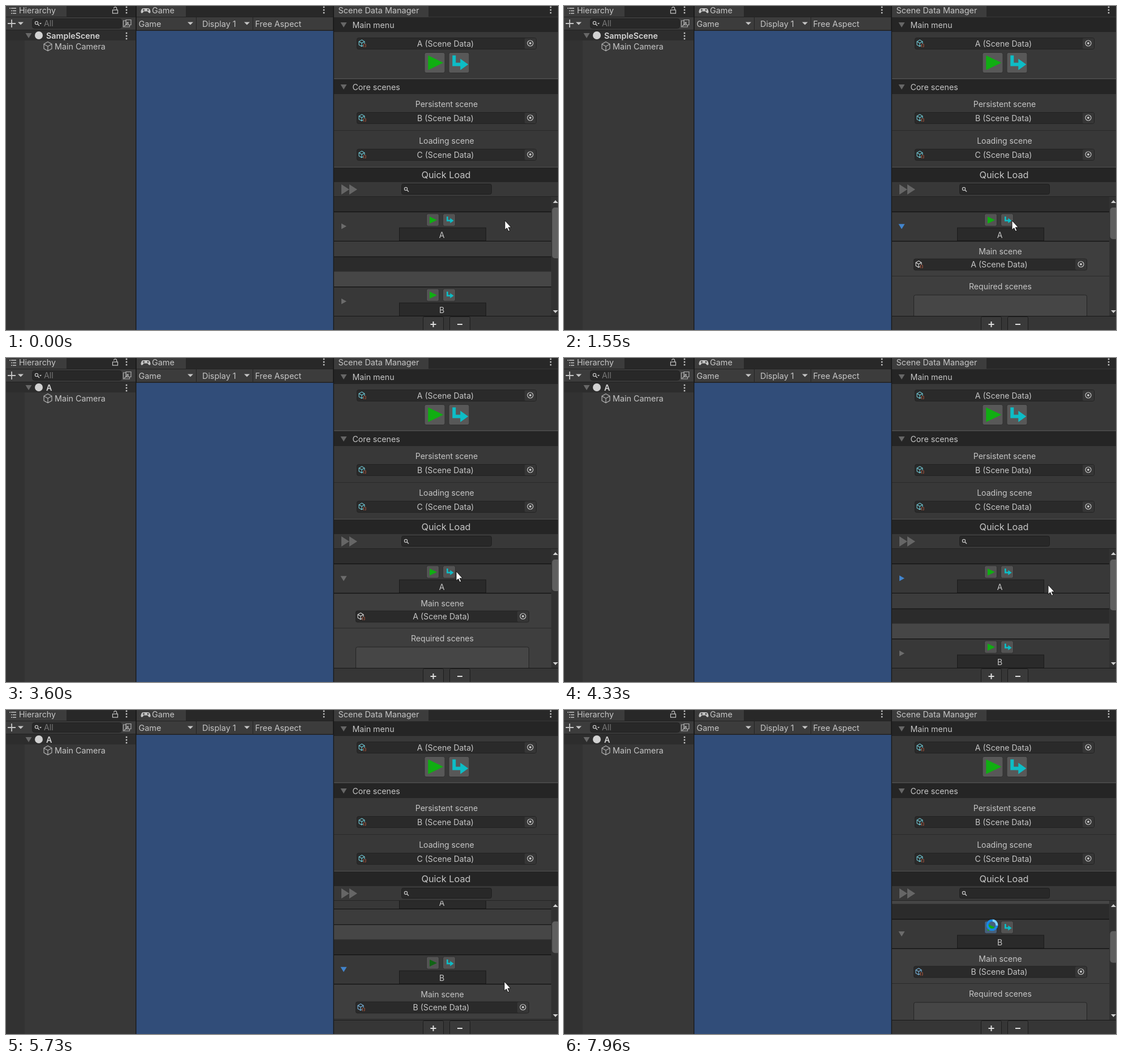
Animation of 976x574 px, one loop 8000 ms. Source, as an HTML page:

```html
<!DOCTYPE html>
<html lang="en">
<head>
<meta charset="utf-8">
<title>Scene manager</title>
<style>
  html, body { margin: 0; width: 100%; height: 100%; overflow: hidden; background: #383838; }
  svg { display: block; width: 976px; height: 574px; }
  text { font-family: Inter, "Liberation Sans", sans-serif; white-space: pre; }
</style>
</head>
<body>
<svg id="stage" viewBox="0 0 976 574"></svg>
<script>
const LOOP = 8000;
const GREY = '#6c6c6c', BLUE = '#4284cc', INK = '#c6c6c6', DARK = '#282828', LINE = '#1b1b1b';

// Drawing helpers; text is placed by the middle of its capitals.
const rect = (x, y, w, h, fill, extra = '') =>
  `<rect x="${x}" y="${y}" width="${w}" height="${h}" fill="${fill}" ${extra}/>`;
const box = (x, y, w, h, fill, border = LINE, r = 3) =>
  rect(x + .5, y + .5, w - 1, h - 1, fill, `rx="${r}" stroke="${border}"`);
const path = (d, fill, extra = '') => `<path d="${d}" fill="${fill}" ${extra}/>`;
const line = (d, color = INK, width = 1.3) => path(d, 'none', `stroke="${color}" stroke-width="${width}"`);
const dot = (x, y, r, fill, extra = '') => `<circle cx="${x}" cy="${y}" r="${r}" fill="${fill}" ${extra}/>`;
const text = (x, y, str, { size = 14.2, fill = INK, anchor = 'start', weight = 400 } = {}) =>
  `<text x="${x}" y="${y + size * .36}" font-size="${size}" fill="${fill}" text-anchor="${anchor}" font-weight="${weight}">${str}</text>`;
const centered = (x, y, str, size = 14.1) => text(x, y, str, { size, anchor: 'middle' });
const at = (x, y, body, scale = 1) => `<g transform="translate(${x} ${y}) scale(${scale})">${body}</g>`;

const triDown = (x, y, fill = GREY) => path(`M${x - 5.5} ${y - 4}h11l-5.5 9z`, fill);
const triRight = (x, y, fill = GREY) => path(`M${x - 4} ${y - 5}v10l9 -5z`, fill);
const caret = (x, y) => path(`M${x - 5} ${y - 2.5}h10l-5 5z`, INK);
const kebab = (x, y) => [-5, 0, 5].map(d => rect(x - 1.2, y + d - 1.2, 2.5, 2.5, INK)).join('');
const magnifier = (x, y) =>
  dot(x - 1, y - 1, 2.6, 'none', `stroke="${INK}" stroke-width="1.2"`) + line(`M${x + 1} ${y + 1}l3 3`, INK, 1.5);
const cube = (x, y, r, color, width) => {
  const w = r * .87, h = r / 2;
  return at(x, y, line(`M0 ${-r}L${w} ${-h}V${h}L0 ${r}L${-w} ${h}V${-h}ZM${-w} ${-h}L0 0L${w} ${-h}M0 0V${r}`, color, width));
};
const assetIcon = (x, y, color) => cube(x - 1, y - .7, 5.7, color, 1.1) +
  rect(x + 1.5, y + .5, 6, 6.5, '#2a2a2a') +
  line(`M${x + 3.4} ${y + 1}h-1v5h1M${x + 5} ${y + 1}h1v5h-1`, '#b0563c', 1);

const field = (x, y, w, label, cx, color = '#6fc6d2') =>
  box(x, y, w, 21, '#2a2a2a', '#222') +
  rect(x + w - 21, y + 1, 20, 19, '#363636', 'rx="2"') +
  dot(x + w - 11, y + 10, 5, 'none', `stroke="${INK}" stroke-width="1.2"`) +
  dot(x + w - 11, y + 10, 2, INK) +
  assetIcon(x + 10, y + 10.5, color) + centered(cx, y + 10.5, label);

const playShape = (fill = '#10ae12') => path('M0 0V26L27 13Z', fill);
const loadShape = path('M0 0H6V13H14V6L28 16L14 26V19H0Z', '#0dbdc6');

const panelHeader = (y, label) =>
  rect(580, y, 396, 26, '#252525') + triDown(597, y + 13, '#666') + text(612.5, y + 13.5, label);

function chrome() {
  const hierarchy =
    rect(0, 0, 229, 574, '#383838') + rect(0, 0, 229, 19, DARK) + rect(0, 0, 107, 20, '#3c3c3c') +
    rect(0, 20, 229, 23, '#3c3c3c') + rect(0, 19, 229, 1, '#232323') +
    rect(0, 43, 33, 531, '#323232') + rect(0, 43, 229, 18, '#2d2d2d') + rect(0, 42, 229, 1, '#222') +
    line('M6 4h2M9 4h9M9 8.5h2M12 8.5h6M9 13h2M12 13h6', INK, 1.5) + text(23, 8, 'Hierarchy') +
    rect(188.5, 7, 9, 6, 'none', `stroke="${INK}" stroke-width="1.2"`) +
    line('M190.5 4.5a2.6 2.6 0 0 1 5.2 0V7', INK, 1.2) + kebab(213, 7) +
    line('M3 31h14M10 24v14', INK, 1.8) + caret(26, 31) +
    box(46, 22, 159, 18, DARK, '#202020', 4) + magnifier(55, 31) + path('M59 30h4l-2 2.5z', INK) +
    text(67, 31, 'All', { fill: '#777' }) +
    line('M213 26h-5.5v11h11v-4M212 24.5h9v9h-9zM209 36l7 -7M212 29h4v4', '#b0b0b0', 1.2) +
    triDown(40, 52, '#686868') + dot(58, 52, 7, '#d2d2d2') + kebab(213, 53) +
    cube(74, 71.5, 8, '#aaa', 1.3) + text(86, 71.5, 'Main Camera', { size: 14.35 });

  const pad = path('M243 4h8c3 0 4 3 4.500 6c.3 3 -2.500 3.500 -4 1l-1 -1.500h-7l-1 1.500c-1.500 2.500 -4.300 2 -4 -1c.5 -3 1.500 -6 4.500 -6z', INK) +
    line('M241.500 7h4M243.500 5v4', '#3c3c3c', 1) + dot(251, 7, 1.4, '#3c3c3c');
  const game =
    rect(229, 0, 2, 574, LINE) + rect(231, 0, 347, 19, DARK) + rect(231, 0, 87, 20, '#3c3c3c') +
    rect(231, 19, 347, 1, '#232323') + rect(231, 20, 347, 23, '#3c3c3c') + pad +
    text(258, 8, 'Game', { size: 14.4 }) + kebab(562, 7) +
    text(234.5, 31.5, 'Game', { size: 14.4 }) + caret(326, 31) + rect(336, 20, 1, 22, '#242424') +
    text(347, 31.5, 'Display 1', { size: 14.4 }) + caret(426, 31) + rect(436, 20, 1, 22, '#242424') +
    text(440.5, 31.5, 'Free Aspect', { size: 14.4 }) +
    rect(231, 42.5, 347, 1.5, '#202020') + rect(578, 0, 2, 574, LINE) +
    rect(230.5, 44, 348, 530, '#314d79');

  const bigButton = x => box(x, 82, 37, 37, '#585858', '#303030');
  const manager =
    rect(580, 0, 396, 574, '#383838') + rect(580, 0, 396, 19, DARK) + rect(580, 0, 167, 20, '#3c3c3c') +
    text(587.5, 8, 'Scene Data Manager', { size: 14.45 }) + kebab(963, 7) +
    panelHeader(20, 'Main menu') + field(620, 56, 318, 'A (Scene Data)', 777) +
    bigButton(739.5) + at(746.3, 87.5, playShape()) + bigButton(782.5) + at(789.3, 87.5, loadShape) +
    rect(580, 128, 396, 1, '#525252') + panelHeader(130, 'Core scenes') +
    centered(779, 174, 'Persistent scene') + field(620, 188, 318, 'B (Scene Data)', 777) +
    rect(580, 220, 396, 1, '#2a2a2a') +
    centered(779, 239, 'Loading scene') + field(620, 253, 318, 'C (Scene Data)', 777) +
    rect(580, 285, 396, 1, '#525252') + rect(580, 286, 396, 26, '#252525') +
    centered(778, 299, 'Quick Load', 16.3) +
    path('M593 316v18l14 -9zM607 316v18l14 -9z', '#666') +
    box(699, 315, 160, 19, DARK, '#1e1e1e') + magnifier(708, 325) +
    rect(580, 337, 396, 1, '#242424');

  const footer = rect(580, 549, 396, 25, '#363636') + rect(580, 549, 396, 1, '#181818') +
    [737, 784].map(x => box(x, 550, 37, 30, '#3a3a3a', '#1c1c1c', 2)).join('') +
    line('M750.500 564h10M755.500 559v10M798 564h9', '#e0e0e0', 2);
  return hierarchy + game + manager + footer;
}

function entry(y, name, { open, focus, playDown, loadDown, playFill }) {
  const button = (x, down) => box(x, y + 3.5, 23, 23, down ? '#46607c' : '#535353', '#303030');
  const body = rect(580, y + 53, 384, 250, '#3e3e3e') +
    centered(771.5, y + 71, 'Main scene') +
    field(618, y + 83.5, 307, `${name} (Scene Data)`, 769.5, name === 'A' ? '#d8d8d8' : '#78b4dc') +
    rect(580, y + 114, 384, 1, '#2a2a2a') + centered(771.5, y + 133, 'Required scenes') +
    box(618, y + 147.5, 307, 120, '#464646', '#242424');
  return rect(580, y, 384, 53, '#383838') +
    rect(580, y, 384, 1.3, '#121212') +
    (open ? triDown : triRight)(597, y + 26.3, focus ? BLUE : GREY) +
    button(743, playDown) + at(749, y + 9, playShape(playFill), .48) +
    button(772, loadDown) + at(779, y + 9, loadShape, .45) +
    box(695, y + 28.5, 154, 24, '#2a2a2a', '#1a1a1a', 0) + centered(770.5, y + 41.5, name) +
    (open ? body : '') + rect(580, y + 52, 384, 1.3, '#121212');
}

const within = (t, from, to) => t >= from && t < to;

function list(t) {
  const openA = within(t, 320, 4000), openB = t >= 5150;
  const scroll = t < 5690 ? 0 : t < 6040 ? 64 : 127;
  const swapped = t >= 4600;
  const stripes = swapped ? ['#464646', '#2b2b2b'] : ['#2b2b2b', '#464646'];
  const a = entry(364, 'A', {
    open: openA,
    focus: within(t, 270, 2450) || within(t, 3960, 5110),
    loadDown: within(t, 2450, 2860)
  });
  const b = entry(497, 'B', {
    open: openB,
    focus: within(t, 5110, 7550),
    playDown: t >= 7550,
    playFill: within(t, 5690, 6040) ? '#106414' : undefined
  });
  const between = rect(580, 417.3, 384, 27, '#3c3c3c') + rect(580, 444, 384, 27, stripes[0]) +
    rect(580, 470.5, 384, 27, stripes[1]) + rect(580, 443.7, 384, 1.2, '#141414');
  const thumb = openA || openB ? 56 : 90;
  return `<g clip-path="url(#view)">` + at(0, -scroll,
      rect(580, 337, 384, 27, '#2d2d2d') + (openA ? a : a + between + b)) + '</g>' +
    rect(964, 338, 12, 211, '#323232') +
    path('M967 349h9l-4.500 -5zM967 539h9l-4.500 5z', '#d0d0d0') +
    rect(965.5, 357 + scroll * .274, 14, thumb, '#5f5f5f', 'rx="5"');
}

// time, x, y of the pointer tip
const track = [
  [840, 882, 381], [1060, 861, 384], [1350, 803, 373], [1610, 789, 383], [1780, 784, 381], [1950, 784, 380],
  [3500, 784, 380], [3700, 808, 379], [3950, 850, 390],
  [4230, 850, 390], [4330, 856, 403], [4560, 874, 475], [4740, 878, 503],
  [5200, 878, 503], [5490, 880.5, 482],
  [6270, 880.5, 482], [6430, 841, 428], [6660, 793, 382], [7060, 758, 381], [7090, 757, 380]
];
function pointerAt(t) {
  const next = track.findIndex(key => key[0] > t);
  if (next === 0) return track[0].slice(1);
  if (next < 0) return track.at(-1).slice(1);
  const [t0, x0, y0] = track[next - 1], [t1, x1, y1] = track[next];
  const k = (t - t0) / (t1 - t0);
  return [x0 + (x1 - x0) * k, y0 + (y1 - y0) * k];
}

const clicks = [[270, 370], [2450, 2590], [3960, 4060], [5110, 5200], [7550, 7690]];
const waits = [[2590, 2860], [7690, LOOP]];
const arrow = path('M0 -1V15.600L3.700 12.200L6.300 18L8.800 16.900L6.300 11.200H11.300Z', '#fff', 'stroke="#111" stroke-width="1"');

function pointer(t) {
  const [x, y] = pointerAt(t).map(Math.round);
  const active = spans => spans.some(span => within(t, ...span));
  if (active(waits)) {
    const turn = (t - 7960) * .36 - 85;
    return dot(x, y + 1, 8.3, 'none', 'stroke="#1788e6" stroke-width="4"') +
      dot(x, y + 1, 8.3, 'none', `stroke="#83d2fb" stroke-width="4" stroke-dasharray="13 60" transform="rotate(${turn} ${x} ${y + 1})"`);
  }
  return (active(clicks) ? dot(x, y, 11, '#d2c83c', 'fill-opacity=".85"') : '') + at(x, y, arrow);
}

const sceneName = t => text(71, 52.5, t < 2860 ? 'SampleScene' : 'A', { size: 14.35, weight: 600, fill: '#d4d4d4' });

const stage = document.getElementById('stage');
stage.innerHTML = `<defs><clipPath id="view">${rect(580, 338, 384, 211, '#000')}</clipPath></defs>` +
  chrome() + '<g id="live"></g>';
const live = document.getElementById('live');
let shown = '';

function draw() {
  const t = performance.now() % LOOP;
  const markup = sceneName(t) + list(t) + pointer(t);
  if (markup !== shown) live.innerHTML = shown = markup;
  requestAnimationFrame(draw);
}
draw();
</script>
</body>
</html>
```
